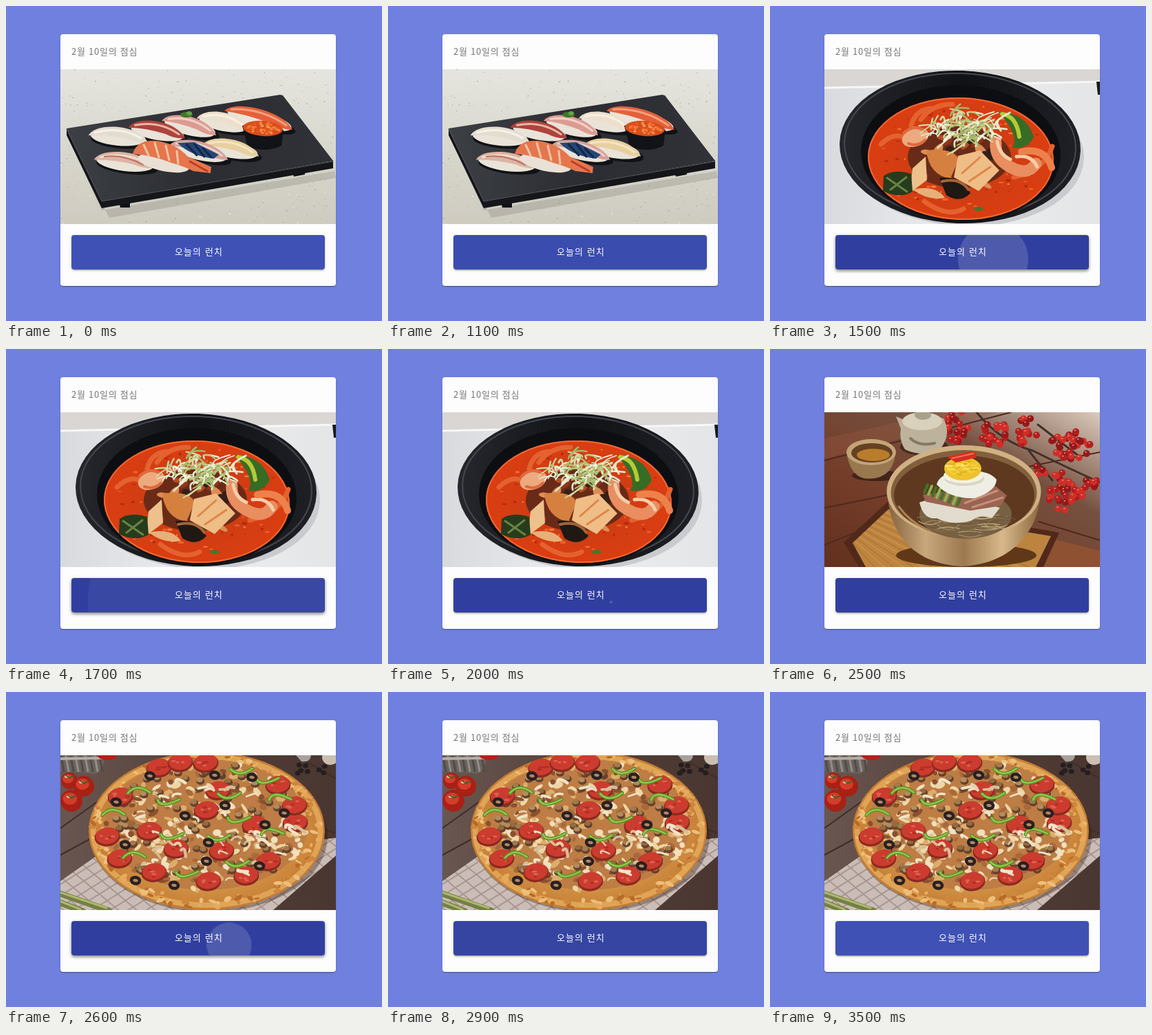
Recreate the animation shown at these times as an HTML page. Size 546x458 px, loop 4.4 s.

```html
<!DOCTYPE html>
<html lang="ko">
<head>
<meta charset="utf-8">
<title>오늘의 런치</title>
<style>
  html, body { margin: 0; width: 100%; height: 100%; overflow: hidden; background: #7080df; }
  body { position: relative; font-family: "Noto Sans CJK KR", "Noto Sans CJK", "Noto Sans", sans-serif; font-size: 13px; }
  .card {
    position: absolute; left: 79px; top: 41px; width: 400px; height: 366px;
    border-radius: 4px; background: #fdfdfd;
    box-shadow: 0 2px 1px -1px rgba(0,0,0,.2), 0 1px 1px rgba(0,0,0,.14), 0 1px 3px rgba(0,0,0,.12);
  }
  .date { position: absolute; left: 16px; top: 15px; line-height: 20px; letter-spacing: .75px; color: rgba(0,0,0,.54); white-space: nowrap; }
  .photo { position: absolute; left: 0; top: 51px; width: 400px; height: 225px; opacity: 0; }
  .photo, .button, .ripple { animation: 4400ms step-end infinite; }
  .button {
    --rest: 0 3px 1px -2px rgba(0,0,0,.2), 0 2px 2px rgba(0,0,0,.14), 0 1px 5px rgba(0,0,0,.12);
    --raised: 0 2px 4px -1px rgba(0,0,0,.3), 0 3px 4px rgba(0,0,0,.2), 0 1px 6px rgba(0,0,0,.14);
    position: absolute; left: 16px; top: 292px; width: 368px; height: 50px;
    border-radius: 4px; color: #fff; font-weight: 500; letter-spacing: 1.1px; text-indent: 2px;
    line-height: 47px; text-align: center; box-shadow: var(--rest);
    animation-name: press;
  }
  .clip { position: absolute; inset: 0; overflow: hidden; border-radius: 4px; }
  .ripple {
    position: absolute; left: -4px; top: -198px; width: 466px; height: 466px;
    border-radius: 50%; background: #fff; opacity: 0; animation-name: ripple;
  }
  #sushi { animation-name: sushi; }
  #soup { animation-name: soup; }
  #noodles { animation-name: noodles; }
  #pizza { animation-name: pizza; }

  @keyframes sushi { 0% { opacity: 1 } 34.09%, 100% { opacity: 0 } }
  @keyframes soup { 0% { opacity: 0 } 34.09% { opacity: 1 } 47.72%, 100% { opacity: 0 } }
  @keyframes noodles { 0% { opacity: 0 } 47.72% { opacity: 1 } 59.09%, 100% { opacity: 0 } }
  @keyframes pizza { 0% { opacity: 0 } 59.09%, 100% { opacity: 1 } }
  @keyframes press {
    0% { background: #3f51b5; box-shadow: var(--rest) }
    25% { background: #3a4cae; box-shadow: var(--rest) }
    34.09% { background: #303f9f; box-shadow: var(--raised) }
    40.9% { background: #303f9f; box-shadow: var(--rest) }
    47.72% { background: #303f9f; box-shadow: var(--raised) }
    52.27% { background: #303f9f; box-shadow: var(--rest) }
    59.09% { background: #303f9f; box-shadow: var(--raised) }
    65.9% { background: #3645a2; box-shadow: var(--rest) }
    79.54%, 100% { background: #3f51b5; box-shadow: var(--rest) }
  }
  @keyframes ripple {
    0% { opacity: 0; transform: scale(0) }
    34.09% { opacity: .15; transform: scale(.219) }
    36.36% { opacity: .12; transform: scale(.66) }
    38.63% { opacity: .05; transform: scale(.88) }
    40.9% { opacity: 0; transform: scale(0) }
    45.45% { opacity: .15; transform: scale(.009) }
    47.72% { opacity: .15; transform: scale(.2) }
    50% { opacity: .1; transform: scale(.64) }
    52.27% { opacity: 0; transform: scale(0) }
    59.09% { opacity: .15; transform: scale(.14) }
    61.36% { opacity: .13; transform: scale(.58) }
    63.63% { opacity: .06; transform: scale(.84) }
    65.9%, 100% { opacity: 0; transform: scale(0) }
  }
</style>
</head>
<body>
<div class="card">
  <div class="date">2월 10일의 점심</div>
  <svg class="photo" id="sushi" viewBox="79 92 400 225"></svg>
  <svg class="photo" id="soup" viewBox="79 92 400 225"></svg>
  <svg class="photo" id="noodles" viewBox="79 92 400 225"></svg>
  <svg class="photo" id="pizza" viewBox="79 92 400 225"></svg>
  <div class="button"><div class="clip"><div class="ripple"></div></div>오늘의 런치</div>
</div>
<script>
  let seed = 7;
  const rand = (lo = 0, hi = 1) => {
    seed = (seed * 16807) % 2147483647;
    return lo + (hi - lo) * seed / 2147483647;
  };
  const pick = list => list[Math.floor(rand(0, list.length))];
  const many = (n, draw) => Array.from({ length: n }, (_, i) => draw(i)).join('');

  // Shapes in stage coordinates.
  const oval = (x, y, rx, ry, fill, turn = 0, more = '') =>
    `<ellipse cx="${x}" cy="${y}" rx="${rx}" ry="${ry}" fill="${fill}" transform="rotate(${turn} ${x} ${y})" ${more}/>`;
  const path = (d, fill) => `<path d="${d}" fill="${fill}"/>`;
  const line = (d, color, width) =>
    `<path d="${d}" fill="none" stroke="${color}" stroke-width="${width}" stroke-linecap="round"/>`;
  const back = fill => `<rect x="79" y="92" width="400" height="225" fill="${fill}"/>`;
  const shade = (id, type, dir, ...colors) => `<${type}Gradient id="${id}" ${dir}>` +
    colors.map((c, i) => `<stop offset="${i / (colors.length - 1)}" stop-color="${c}"/>`).join('') +
    `</${type}Gradient>`;
  const down = 'x1="0" y1="0" x2="0" y2="1"';
  const across = 'x1="0" y1="0" x2="1" y2="0"';
  const inOval = (x, y, rx, ry) => {
    const a = rand(0, Math.PI * 2), r = Math.sqrt(rand());
    return [x + rx * r * Math.cos(a), y + ry * r * Math.sin(a)];
  };
  const show = (id, ...parts) => { document.getElementById(id).innerHTML = parts.join(''); };

  const nigiri = (x, y, half, turn, top, stripe) =>
    oval(x + 3, y + 9, half, 11, '#111216', turn) +
    oval(x, y + 4, half - 3, 12, '#e9e3d8', turn) +
    `<g transform="translate(${x} ${y}) rotate(${turn})">` +
    path(`M${-half} 5C${-half + 8} -15 ${half - 18} -18 ${half} 6Q${half - 14} 10 ${half * .3} 5Q${-half * .4} 1 ${-half} 5Z`, top) +
    line(`M${-half + 9} 0Q0 -13 ${half - 10} 2`, stripe, 3) + '</g>';

  show('sushi',
    shade('stone', 'linear', down, '#e5e5df', '#d9d8ce', '#cecbbf'),
    shade('slab', 'linear', across, '#3c3f44', '#2b2d32', '#303238'),
    back('url(#stone)'),
    many(420, () => oval(rand(79, 479), rand(92, 317), rand(.4, 1.1), rand(.4, .9), pick(['#b6b1a3', '#f0efea', '#c3bba8', '#a7a59b']))),
    path('M90 190L139 297L477 240L479 250L150 308Z', 'rgba(90,88,80,.2)'),
    path('M164 286h16v7h-14zM416 242l18-4v7l-16 3z', '#101114'),
    path('M88 178L139 283L475 225V236L139 294L88 188Z', '#15161a'),
    path('M88 178L398 129L402 130L475 225L139 284Z', 'url(#slab)'),
    line('M88 179L139 284L475 226', '#54575c', 1),
    nigiri(368, 161, 51, 15, '#e5603a', '#f3a27c'),
    nigiri(316, 166, 39, 11, '#eddfcd', '#f8f0e4'),
    nigiri(267, 172, 41, 14, '#dc9b92', '#efd0c5'),
    nigiri(220, 179, 42, 10, '#ad433d', '#e7b6a5'),
    nigiri(163, 187, 43, 5, '#e4dccf', '#f6f1e8'),
    oval(262, 158, 9, 4, '#3c782e'), oval(266, 156, 4, 3, '#65a343'),
    path('M343 174Q371 165 403 180L400 203Q380 214 351 205Z', '#121317'),
    oval(373, 178, 29, 11, '#d94d1c', 4),
    many(55, () => oval(...inOval(373, 178, 26, 9), 2, 1.6, pick(['#f27a32', '#e85a20', '#f89a56']))),
    nigiri(327, 205, 42, 10, '#e7cf9f', '#f5e5c1'),
    nigiri(281, 208, 44, 13, '#d6a19a', '#ecd0c8'),
    path('M249 199L273 198L309 216L302 222Q268 218 249 199Z', '#244778'),
    line('M262 201L277 217M274 201L288 219M286 207L298 220', '#132746', 3),
    nigiri(173, 224, 45, 7, '#dcb5a4', '#f1dfd2'),
    line('M143 219Q171 215 199 231', '#bd7064', 2),
    oval(229, 228, 38, 12, '#e9e1d5', 12),
    path('M184 215Q190 194 219 196Q247 200 264 219L298 234L297 243L272 240Q258 233 240 228Q213 217 184 215Z', '#e5764d'),
    line('M200 202L207 217M216 199L222 220M232 203L237 224M248 211L250 229', '#f7c4a3', 3),
    line('M267 226L292 240', '#bf3d25', 3)
  );

  show('soup',
    shade('cloth', 'linear', across, '#d8dade', '#eceef0', '#e4e5e7'),
    shade('bowl', 'linear', across, '#25272c', '#111216', '#1f2025'),
    shade('broth', 'radial', '', '#b93a13', '#cf3d13', '#db3d12'),
    back('url(#cloth)'),
    path('M79 92H479V110L79 119Z', '#d9d6d4'),
    line('M79 119L479 110', '#f7f7f7', 3),
    path('M474 110H479V129H476Z', '#18191c'),
    oval(281, 214, 175, 106, '#c9cbcf', 3),
    oval(276, 205, 175, 111, 'url(#bowl)', 2),
    oval(276, 203, 168, 105, 'none', 2, 'stroke="#44484f" stroke-width="2"'),
    oval(277, 214, 145, 99, '#0d0e11', 2),
    oval(277, 222, 135, 89, 'url(#broth)', 2),
    oval(277, 222, 134, 88, 'none', 2, 'stroke="#ee6a30" stroke-width="2"'),
    many(100, () => oval(...inOval(277, 222, 124, 79), rand(1, 4), rand(.7, 2), pick(['#ed6429', '#b12b0c', '#f07c39']))),
    line('M205 174Q211 151 233 149M219 165Q236 142 265 143M161 201Q187 176 206 202M354 249Q399 238 410 204M224 284Q257 308 281 295', '#e4622f', 7),
    oval(275, 220, 75, 45, '#692b18'),
    many(30, () => oval(...inOval(275, 225, 76, 42), rand(5, 13), rand(3, 7), pick(['#342019', '#b54d25', '#df8c54', '#8d351a']), rand(-60, 60))),
    path('M332 154Q372 155 383 190Q375 209 352 206Q363 189 332 154Z', '#376c25'),
    line('M337 157Q358 160 362 190', '#b6c937', 6),
    oval(211, 191, 20, 13, '#edaa7f', -20),
    line('M194 185Q208 171 224 181M201 200Q215 205 225 195', '#df693d', 4),
    line('M328 198Q326 221 347 233Q374 249 386 229', '#e88e61', 17),
    line('M330 197Q333 216 349 223M358 219Q380 216 388 234', '#f5cda7', 5),
    line('M365 212Q400 205 409 235', '#ed814c', 10),
    path('M207 236L226 219L228 253L203 272Z', '#edc18b'),
    path('M227 210Q266 205 274 223L262 251Q231 246 227 210Z', '#d6803f'),
    path('M273 218L305 210L333 239L303 269L267 249Z', '#efbd86'),
    line('M279 243L305 220M289 255L320 234', '#de864b', 3),
    path('M165 247Q181 236 205 244L207 270Q188 281 164 269Z', '#263c1d'),
    line('M170 250L199 270M175 267L198 249', '#678443', 3),
    path('M207 267Q240 259 254 279Q231 284 207 267Z', '#e7b078'),
    path('M246 250Q278 246 291 272Q276 288 256 275Z', '#1f1813'),
    line('M250 255Q276 249 288 267', '#a2663a', 4),
    oval(303, 295, 7, 3, '#47752c'),
    many(95, () => {
      const [x, y] = inOval(284, 181, 52, 25);
      return line(`M${x} ${y}q${rand(-8, 8)} ${rand(-15, -3)} ${rand(-28, 28)} ${rand(-17, 15)}`,
        pick(['#e8ecd0', '#d1dba5', '#b5c67a', '#f3f1df', '#a2b66a']), rand(1.5, 3));
    })
  );

  const berries = (x, y, rx, ry, n) => many(n, () => {
    const [a, b] = inOval(x, y, rx, ry);
    return oval(a, b, 5, 5, pick(['#b41e1d', '#cf2e27', '#951819'])) + oval(a - 1, b - 2, 1.4, 1, '#ec8178');
  });

  show('noodles',
    shade('wood', 'linear', 'x1="0" y1="1" x2="1" y2="0"', '#62301e', '#743d2a', '#75503f', '#dacbbd'),
    shade('brass', 'linear', across, '#85613d', '#c8a77b', '#9d7950', '#d8b98b', '#8b653d'),
    back('url(#wood)'),
    path('M79 130L250 92H330L79 160Z', 'rgba(155,92,67,.3)'),
    line('M79 162L350 92M79 231L479 150M79 285L185 242M390 251L479 278', '#50291d', 2),
    path('M367 265L479 293V317H335Z', '#8e5131'),
    line('M300 92Q335 135 382 148Q424 169 479 194M389 110L449 156M376 148L410 191', '#423027', 3),
    path('M107 281L171 222L420 267L397 317H129Z', '#51291b'),
    path('M120 282L172 233L408 272L386 317H139Z', '#bd8440'),
    many(17, i => line(`M${120 + i * 3.2} ${282 - i * 3}L${152 + i * 14} 317`, i % 2 ? '#d09b55' : '#a46f33', 1)),
    berries(270, 112, 18, 23, 22), berries(327, 123, 21, 17, 25), berries(372, 119, 17, 22, 18),
    berries(437, 139, 29, 21, 32), berries(428, 205, 28, 30, 38), berries(390, 177, 12, 7, 6), berries(465, 195, 12, 8, 8),
    oval(154, 184, 35, 8, '#40241b'),
    path('M111 150Q116 183 136 188Q160 191 173 177Q182 165 182 150Z', '#98784f'),
    oval(147, 150, 36, 19, '#c2a477'), oval(148, 151, 30, 14, '#664022'), oval(150, 154, 24, 9, '#b97c2b'),
    oval(224, 142, 35, 13, '#48291e'),
    path('M183 98L197 104Q220 91 252 101Q265 126 245 148Q218 157 196 146Q187 132 190 116Z', '#bdb39d'),
    oval(221, 105, 29, 13, '#d9d1bc'), oval(222, 96, 12, 7, '#aaa18c'),
    line('M204 130Q216 142 239 137', '#877a62', 4),
    oval(285, 300, 102, 17, '#603818'),
    path('M170 204C173 278 216 312 277 316C345 314 391 270 393 206Z', 'url(#brass)'),
    oval(281.5, 207, 112, 67, '#d0b184'), oval(281.5, 209, 106, 62, '#82603d'), oval(282, 213, 102, 58, '#5f3820'),
    line('M187 229Q226 283 309 269', '#ab8253', 3),
    oval(284, 241, 67, 35, '#776043'),
    many(55, () => {
      const [x, y] = inOval(284, 251, 58, 20);
      return line(`M${x - 16} ${y}q16 ${rand(-12, 14)} 32 0`, pick(['#a38c64', '#6d5639', '#c2aa7e', '#897048']), 1.2);
    }),
    path('M217 223Q259 208 334 231L322 246Q305 240 293 249Q265 258 242 246Q223 249 217 223Z', '#e1dccd'),
    path('M222 212L262 206L327 199L344 213L335 228L291 235L226 222Z', '#9b6352'),
    line('M283 224L330 206M294 230L338 216', '#c58f78', 3),
    many(9, i => line(`M${229 + i * 6} ${197 + i * 2.3}l-5 12`, i % 2 ? '#8eb54d' : '#3c742d', 4)),
    path('M242 197Q246 179 284 177Q319 176 329 190Q328 207 297 217Q261 218 242 197Z', '#efeee4'),
    oval(282, 188, 29, 11, '#d8d6c6'), oval(281, 184, 29, 11, '#f5f1df'),
    oval(280, 174, 27, 17, '#edc32c'),
    many(30, () => {
      const [x, y] = inOval(280, 171, 21, 12);
      return line(`M${x - 5} ${y}q5 ${rand(-8, 8)} 10 0`, pick(['#ffe66b', '#dda819', '#f6d344']), 1.5);
    }),
    path('M257 157L291 149Q304 150 299 158L270 165Z', '#d62d20'),
    line('M264 159L295 152', '#f4735a', 2)
  );

  const spots = text => text.split(' ').map(p => p.split(',').map(Number));
  const meat = spots('222,110 290,103 166,152 147,210 215,262 247,228 294,275 291,172 313,231 349,267 381,246 361,193 420,190 308,143 395,135 208,202 253,102 165,242 419,165');
  const olives = spots('209,122 303,121 357,124 318,165 376,193 294,219 173,222 291,246 188,274 244,281 368,253 404,176 260,180 160,160');
  const peppers = spots('192,147 235,157 341,112 397,157 323,148 240,207 185,241 262,262 335,247 386,207 308,209 337,183 155,179 379,126');
  const tomato = (x, y, r) =>
    oval(x, y, r, r, '#a92015') + oval(x - 2, y - 3, r * .65, r * .55, '#d23d29') + oval(x - 4, y - 6, 3, 2, '#f6b39d') +
    line(`M${x - 5} ${y - 8}l5 4l6 -3`, '#466127', 2);

  show('pizza',
    shade('table', 'linear', 'x1="0" y1="0" x2="1" y2="0"', '#695650', '#544039', '#4a3630'),
    shade('crust', 'radial', '', '#e7bd73', '#dca354', '#c47c33'),
    `<pattern id="weave" width="18" height="14" patternUnits="userSpaceOnUse" patternTransform="rotate(-32) skewX(18)">
      <rect width="18" height="14" fill="#a8958e"/><rect width="16" height="12" fill="#cabdb7"/></pattern>`,
    back('url(#table)'),
    line('M79 198L160 140M79 237L138 205M420 92L479 126M455 198L479 205', '#3f2e28', 2),
    path('M79 275L129 240L455 215L479 212V238L388 317H79Z', 'url(#weave)'),
    path('M79 92H143Q143 112 130 119L79 115Z', '#6a625d'),
    many(9, i => line(`M${80 + i * 7} 94l4 21`, i % 2 ? '#958d87' : '#514b48', 3)),
    line('M79 97L141 96', '#b4aca5', 4),
    oval(147, 92, 14, 7, '#b42019'),
    tomato(92, 129, 12), tomato(113, 137, 15), tomato(95, 158, 16),
    path('M421 92H443Q442 103 429 101Z', '#a7a19c'), oval(471, 95, 12, 11, '#cbbfb1'),
    many(8, () => oval(rand(423, 463), rand(105, 119), 4, 3.5, '#241f20')),
    line('M78 293L150 318M78 306L112 319', '#738044', 9),
    line('M78 291L146 314M78 304L108 316', '#aeb76e', 3),
    oval(295, 210, 172, 110, 'rgba(40,22,14,.35)'),
    oval(291.5, 202, 171.5, 115, 'url(#crust)'),
    oval(291.5, 202, 165, 108, 'none', 0, 'stroke="#dfa456" stroke-width="8"'),
    many(190, () => {
      const a = rand(0, 6.28), r = rand(.87, .98);
      return oval(291 + 170 * r * Math.cos(a), 202 + 114 * r * Math.sin(a), rand(2, 7), rand(1, 4), pick(['#b96b28', '#edbf7c', '#cf873d', '#e5aa5e']), rand(-50, 50));
    }),
    oval(291, 193, 148, 95, '#bd7d45'),
    many(280, () => oval(...inOval(291, 194, 146, 94), rand(3, 9), rand(2, 5), pick(['#eed6a6', '#dcae6d', '#f2dfbd', '#a9693a', '#8a5130']), rand(-60, 60))),
    many(95, () => {
      const [x, y] = inOval(291, 193, 142, 91);
      return oval(x, y + 1, 6, 5, '#65422b') + oval(x - 1, y - 1, 4.5, 3.3, pick(['#a47a4c', '#b28c5d', '#956a40']));
    }),
    meat.map(([x, y]) => oval(x, y + 1, 18.5, 13.5, '#8c2a20', -8) + oval(x, y - 1, 17, 12, '#cb3c2f', -8) +
      many(4, () => oval(...inOval(x, y, 11, 7), rand(2, 4), 1.5, pick(['#de6350', '#b32d23'])))).join(''),
    many(48, () => {
      const [x, y] = inOval(291, 195, 130, 86);
      return line(`M${x} ${y}q${rand(-5, 9)} ${rand(-9, 2)} ${rand(5, 16)} ${rand(-5, 10)}`, pick(['#f2e4c8', '#e6d2ad', '#d8bd98']), rand(2, 5));
    }),
    peppers.map(([x, y], i) => {
      const d = `M${x - 15} ${y}q${i % 2 ? 5 : 13} ${i % 3 ? 13 : -15} 32 -1`;
      return line(d, '#568c25', 5) + line(d, '#91c94a', 2.5);
    }).join(''),
    olives.map(([x, y]) => oval(x, y, 6, 4.5, '#b08764', 10, 'stroke="#292021" stroke-width="4.5"')).join('')
  );
</script>
</body>
</html>
```
